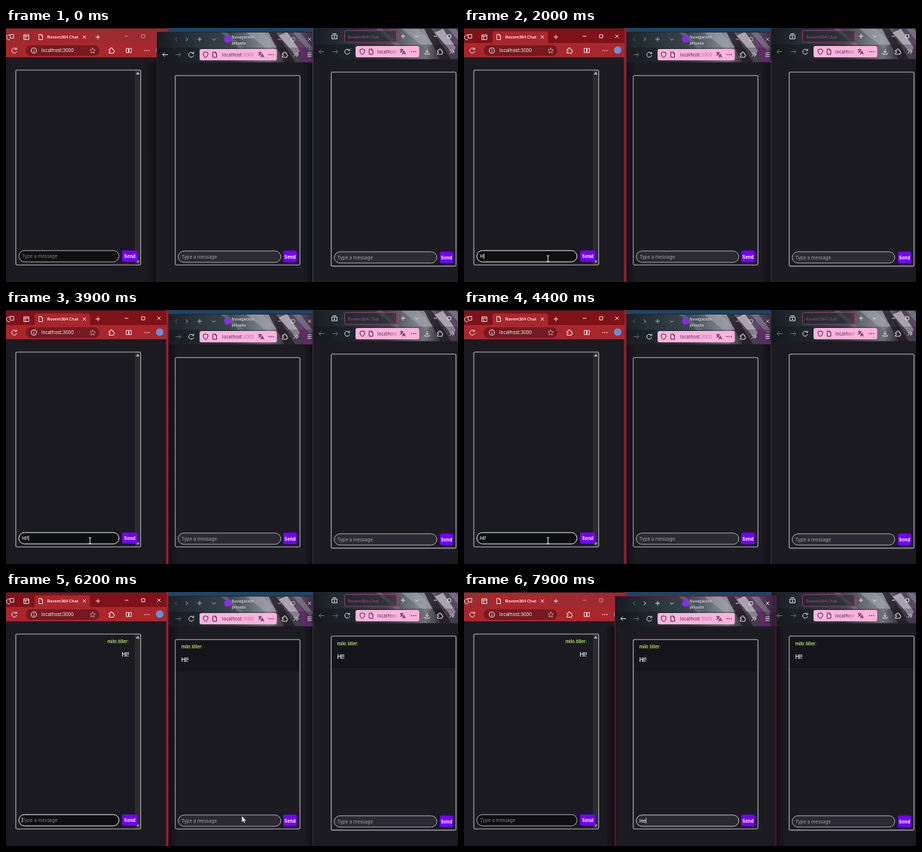
An HTML page that plays this animation: 600 by 338 pixels, repeating every 8000 ms.

```html
<!DOCTYPE html>
<html lang="en">
<head>
<meta charset="utf-8">
<title>Chat demo</title>
<style>
html, body { margin: 0; width: 100%; height: 100%; overflow: hidden; background: #1b1a20; }
svg { display: block; width: 100%; height: 100%; }
text { white-space: pre; }
.ui { font-family: "Open Sans", "Noto Sans", sans-serif; }
.chat { font-family: Inter, Roboto, sans-serif; }
</style>
</head>
<body>
<svg id="stage" viewBox="0 0 600 338">
  <defs>
    <linearGradient id="sky" gradientUnits="userSpaceOnUse" x1="0" x2="214" y1="0" y2="0">
      <stop offset="0" stop-color="#171b20"/><stop offset=".22" stop-color="#273138"/>
      <stop offset=".45" stop-color="#39434a"/><stop offset=".6" stop-color="#6c727b"/>
      <stop offset=".7" stop-color="#8d8e98"/><stop offset=".78" stop-color="#4a4550"/>
      <stop offset=".88" stop-color="#584a62"/><stop offset="1" stop-color="#33203a"/>
    </linearGradient>
    <linearGradient id="fade" x1="0" x2="1">
      <stop offset=".6" stop-color="#3a2440"/><stop offset="1" stop-color="#3a2440" stop-opacity=".15"/>
    </linearGradient>
    <linearGradient id="shadeL"><stop offset="0" stop-opacity="0"/><stop offset="1" stop-opacity=".4"/></linearGradient>
    <linearGradient id="shadeR"><stop offset="0" stop-opacity=".4"/><stop offset="1" stop-opacity="0"/></linearGradient>
  </defs>
  <rect width="600" height="338" fill="#1c4566"/>
  <g id="windows"><g id="L"></g><g id="M"></g><g id="R"></g></g>
  <g id="arrow"><path d="M0 0V8.4L2 6.7L3.3 9.6L4.6 9L3.4 6.2H6Z" fill="#fff" stroke="#222" stroke-width=".4"/></g>
  <g id="beam"><path d="M-1.8-4H1.8M0-4V4M-1.8 4H1.8" fill="none" stroke="#e8e8e8" stroke-width=".9"/></g>
</svg>
<script>
const LOOP = 8000, STEP = 100;
const USER = 'milo.tiller:', TITLE = 'Rovem364 Chat';
const $ = id => document.getElementById(id);

// Icon outlines, centred on 0,0
const ICONS = {
  back: 'M3.5 0H-3.5M-.7-2.8L-3.5 0L-.7 2.8',
  next: 'M-3.5 0H3.5M.7-2.8L3.5 0L.7 2.8',
  reload: 'M2.6-1.9A3.3 3.3 0 1 0 3.2.8M3.1-3.8V-1.5H.8',
  plus: 'M-3 0H3M0-3V3',
  cross: 'M-2.2-2.2L2.2 2.2M2.2-2.2L-2.2 2.2',
  min: 'M-2.3 0H2.3',
  max: 'M-2.1-2.1H2.1V2.1H-2.1Z',
  down: 'M-2.4-1L0 1.4L2.4-1',
  left: 'M1.2-2.5L-1.2 0L1.2 2.5',
  right: 'M-1.2-2.5L1.2 0L-1.2 2.5',
  more: 'M-3.2-2.6L-.6 0L-3.2 2.6M.4-2.6L3 0L.4 2.6',
  menu: 'M-2.8-2.4H2.8M-2.8 0H2.8M-2.8 2.4H2.8',
  doc: 'M-2.4-3.5H.8L2.5-1.8V3.5H-2.4ZM.8-3.5V-1.8H2.5',
  shield: 'M0-3.7L3-2.6V0Q2.6 2.6 0 3.8Q-2.6 2.6-3 0V-2.6Z',
  puzzle: 'M-3.2-1.8H-1.2Q-1.6-3.8 0-3.8T1.2-1.8H2.8V.1Q4-.1 4 1T2.8 1.9V3.5H-3.2V1.7Q-1.6 1.8-1.6.7T-3.2-.1Z',
  split: 'M-3.4-2.8H-.5V2.8H-3.4ZM.5-2.8H3.4V2.8H.5Z',
  info: 'M-3.6 0A3.6 3.6 0 1 0 3.6 0A3.6 3.6 0 1 0-3.6 0M0-.5V2M0-2V-1.3',
  star: 'M0-3.6L1.1-1.2L3.6-.9L1.7.8L2.2 3.4L0 2.1L-2.2 3.4L-1.7.8L-3.6-.9L-1.1-1.2Z',
  save: 'M0-3.5V1.4M-2-.6L0 1.4L2-.6M-3 1.6V3.3H3V1.6',
  lang: 'M-3.6-2.6H1M-1.4-3.8V-2.6M.2-2.6Q-.8.4-3.6 1.2M-2.7-2.2Q-1.8 0 .2.8M-.2 3.8L1.8-.9L3.8 3.8M.6 2.2H3',
  pages: 'M-3.3-3H3.3V3.4H-3.3ZM-3.3-1.1H3.3M-1-1V3.4',
  group: 'M-1.8-2.4A3.2 3.2 0 1 0-1.8 3.4M-1.4-3.4H3.2V1.6H-1.4Z',
  box: 'M-3.4-1.6H3.4V3.4H-3.4ZM-2.4-3.4H2.4M-1 1L0 2L1 1M0-.6V1.8'
};
const icon = (name, x, y, color = '#e6e2e6', w = .9) =>
  `<path d="${ICONS[name]}" transform="translate(${x} ${y})" fill="none" stroke="${color}" stroke-width="${w}"/>`;
const dots = (x, y, color) => [-2.8, 0, 2.8].map(d => `<circle cx="${x + d}" cy="${y}" r=".75" fill="${color}"/>`).join('');
const rect = (x, y, x2, y2, fill, extra = '') =>
  `<rect x="${x}" y="${y}" width="${x2 - x}" height="${y2 - y}" fill="${fill}" ${extra}/>`;
const poly = (points, fill, opacity = 1) => `<polygon points="${points}" fill="${fill}" opacity="${opacity}"/>`;
const text = (x, y, s, size, fill, cls = 'chat', extra = '') =>
  `<text x="${x}" y="${y}" class="${cls}" font-size="${size}" fill="${fill}" ${extra}>${s}</text>`;

const DARK = '#3a2440', PINK = '#ffb3dd', PAGE = '#1c1b22';
const LINE = '#acacb0', DIM = '#a0a0a5';
const pill = (x, y, x2) => rect(x, y, x2, y + 15, PINK, 'rx="2.5"');
const shadeL = (x, y) => rect(x - 13, y, x, 338, 'url(#shadeL)');
const shadeR = (x, y) => rect(x, y, x + 13, 338, 'url(#shadeR)');

// Abstract header artwork, shared by both themed windows
const art = (x, y) => `<g transform="translate(${x} ${y})">
  ${rect(0, 0, 214.5, 41, 'url(#sky)')}
  ${poly('84,0 92,0 116,21 112,24', '#7d868c', .45)}
  ${poly('118,0 140,0 160,20 150,26', '#a9abb4', .5)}
  ${poly('148,0 158,0 184,41 170,41', '#231d27', .8)}
  ${poly('162,5 173,0 190,25 186,33', '#cfcad6', .7)}
  ${poly('180,0 190,0 207,22 204,28', '#8d8498', .6)}
  ${poly('188,14 200,24 208,41 194,41', '#82308a', .75)}
  ${rect(0, 21, 214.5, 41, '#15141a', 'opacity=".25"')}
  ${rect(0, 21, 56, 41, '#12141a', 'opacity=".3"')}</g>`;

// Frame, input and button of one chat page
function chatPage(id, p) {
  const [x, y, x2, y2] = p.frame, [ix, iy, ix2, iy2] = p.input, [bx, by, bx2, by2] = p.button;
  const own = id === 'L', tx = own ? x2 - 15.5 : x + 8;
  const anchor = own ? 'text-anchor="end"' : '';
  const base = (iy + iy2) / 2 + 2.2;
  return `
    <g id="${id}msg">
      ${own ? '' : rect(x, y, x2, y + 42.5, '#15141a')}
      ${text(tx, y + 12, USER, 5.8, '#a9d65c', 'chat', 'font-weight="700" ' + anchor)}
      ${text(tx, y + 29.7, 'HI!', 7.2, '#f4f4f6', 'chat', 'font-weight="600" ' + anchor)}
    </g>
    ${own ? rect(171, y, x2, y2, '#2b2b2e') + poly('172.2,62 177.6,62 174.9,58', '#a5a5a8') +
      poly('172.4,309.5 177.2,309.5 174.8,313', '#a5a5a8') : ''}
    ${rect(x, y, x2, y2, 'none', `rx="1.5" stroke="${LINE}" stroke-width="1.1"`)}
    ${rect(ix, iy, ix2, iy2, p.fill, `rx="${(iy2 - iy) / 2}" stroke="${DIM}" id="${id}box"`)}
    ${text(ix + 4.2, base, 'Type a message', 6.1, p.hint, 'chat', `id="${id}hint"`)}
    ${text(ix + 4.2, base, '', 6.1, '#f4f4f6', 'chat', `id="${id}val" font-weight="500"`)}
    ${rect(0, base - 5.8, .7, base + 1.3, '#fff', `id="${id}caret"`)}
    ${rect(bx, by, bx2, by2, '#7300f7', 'rx="2"')}
    ${text((bx + bx2) / 2, base, 'Send', 6, '#fff', 'chat', 'font-weight="700" text-anchor="middle"')}`;
}

$('L').innerHTML = `
  ${shadeR(215.5, 46)}
  ${rect(0, 0, 215.5, 338, '#a01d30')}
  ${rect(0, 0, 213, 1, '#2c1720')}
  ${rect(0, 1, 213, 21, '#7f1219', 'id="Lbar"')}
  <path d="M36 21Q38 21 38 18V7Q38 4.5 40.500 4.500H109Q111.500 4.500 111.500 7V18Q111.500 21 114 21Z" fill="#a8272c"/>
  ${rect(0, 20, 213, 39, '#a8272c')}
  ${rect(0, 39, 212.5, 338, '#1b1a20')}
  ${icon('group', 7, 12)}${icon('pages', 27, 12)}${icon('doc', 46, 12)}
  ${text(54.8, 14.1, TITLE, 5.5, '#fff', 'ui', 'font-weight="600"')}
  ${icon('cross', 104, 12)}${icon('plus', 122, 12)}
  <g id="Lctl">${icon('min', 160, 11)}${icon('max', 182, 11)}${icon('cross', 203, 11)}</g>
  ${icon('reload', 11, 30)}
  ${rect(26, 23, 124, 37, '#741a20', 'rx="7"')}
  ${icon('info', 37, 30)}${text(47, 32.3, 'localhost:3000', 6.35, '#fff', 'ui')}${icon('star', 115, 30, '#d8b8ba', .7)}
  ${icon('puzzle', 140, 30)}${icon('split', 163, 30)}${dots(187, 30, '#f0e6e6')}
  <circle cx="204" cy="29.500" r="5" fill="#6a8fd8"/>
  ${chatPage('L', { frame: [13, 56, 178.8, 315.2], input: [17, 296.2, 150, 311.2], button: [154, 296, 174.5, 311], fill: '#0d0f10', hint: '#838386' })}`;

$('M').innerHTML = `
  ${shadeL(200, 46)}${shadeR(414, 46)}
  ${art(200, 5)}
  ${rect(200, 45.5, 414.5, 338, PAGE)}
  <g id="Mctl">
    ${icon('left', 226, 15, '#77777f')}${icon('right', 240, 15)}${icon('plus', 257, 15)}${icon('down', 276, 15)}
    ${icon('min', 363, 15)}${icon('max', 381, 15)}${icon('cross', 403, 15)}
  </g>
  <circle cx="294" cy="15" r="4.500" fill="#8a2be8"/>
  ${text(299.5, 14, 'Navegación', 5.4, '#f4f0f6', 'ui')}${text(299.5, 21.5, 'privada', 5.4, '#f4f0f6', 'ui')}
  ${icon('back', 211.5, 35.5)}${icon('next', 228.5, 35.5, '#66666e')}${icon('reload', 246, 35.5)}
  ${pill(257, 28, 359.5)}
  ${icon('shield', 265, 35.5, DARK)}${icon('doc', 277, 35.5, DARK)}
  ${text(287, 38, 'localhost<tspan fill="#a5729a">:3000</tspan>', 6.25, DARK, 'ui')}
  ${icon('lang', 338.5, 35.5, DARK)}${dots(352, 35.5, DARK)}
  ${icon('puzzle', 370, 35.5)}${icon('more', 385, 35.5)}${icon('menu', 403, 35.5)}
  ${chatPage('M', { frame: [224.7, 63.2, 390.2, 315.2], input: [228.7, 296.8, 364.8, 311.8], button: [368, 296.3, 386, 311.7], fill: '#2b2a33', hint: '#a3a2aa' })}
  <path id="Medge" d="M200.500 338V5.500H414V338" fill="none" stroke-width="1"/>`;

$('R').innerHTML = `
  ${shadeL(407, 46)}
  ${art(407, 1)}
  ${rect(407, 0, 600, 1, '#20262c')}
  <circle cx="517" cy="11" r="7" fill="none" stroke="#a02438" stroke-width="1" opacity=".75"/>
  ${rect(407.5, 41.5, 600, 338, PAGE)}
  ${icon('box', 436, 11)}
  ${rect(449.5, 3.5, 518.5, 19, '#20222a', 'rx="2" fill-opacity=".5" stroke="#a33a78" stroke-width=".8"')}
  ${text(454, 13.6, TITLE, 5.6, '#b04a88', 'ui')}
  ${icon('plus', 527, 11)}${icon('down', 545, 11)}${icon('min', 570, 11)}${icon('max', 588.5, 11)}
  ${icon('back', 419, 31.5, '#74747b')}${icon('next', 437, 31.5, '#66666e')}${icon('reload', 453, 31.5)}
  ${pill(464, 24, 548.5)}
  ${icon('shield', 473, 31.5, DARK)}${icon('doc', 484.5, 31.5, DARK)}
  ${text(493, 34, 'localhost', 6.25, 'url(#fade)', 'ui')}
  ${icon('lang', 526.5, 31.5, DARK)}${dots(541, 31.5, DARK)}
  ${icon('save', 559, 31.5)}${icon('puzzle', 576, 31.5)}${icon('more', 592, 31.5)}
  ${chatPage('R', { frame: [431.7, 58.8, 597.3, 316.9], input: [435.7, 297.8, 571.9, 312.8], button: [576, 297.5, 593.5, 313], fill: '#2b2a33', hint: '#a3a2aa' })}
  ${rect(407, 0, 408, 338, '#3d4652', 'id="Redge"')}`;

// Each track lists [start, value]; the value holds until the next start
const TRACKS = {
  order: [[0, 'LMR'], [900, 'MLR'], [6400, 'LRM']],
  Ltext: [[0, ''], [2000, 'H'], [2200, 'HI'], [2800, 'HI!'], [4700, '']],
  Mtext: [[0, ''], [7500, 'H'], [7900, 'He']],
  Lcaret: [[0, 0], [900, 1], [1400, 0], [2000, 1], [2700, 0], [2800, 1], [3400, 0], [3900, 1],
    [4400, 0], [5000, 1], [5500, 0], [6000, 1], [6400, 0]],
  Mcaret: [[0, 0], [6400, 1], [6900, 0], [7400, 1]],
  pointer: [[0, ''], [300, 'arrow'], [900, 'beam'], [5600, 'arrow'], [6300, 'beam'], [7500, '']]
};
const PATH = [[300, 432, 300], [900, 114, 305], [1100, 111.5, 307], [5500, 111.5, 307], [6200, 313, 298], [6400, 312.5, 299]];

const at = (name, t) => TRACKS[name].filter(k => k[0] <= t).pop()[1];
const show = (id, on) => $(id).setAttribute('visibility', on ? 'inherit' : 'hidden');
const paint = (id, attr, value) => $(id).setAttribute(attr, value);

function pointerAt(t) {
  const i = PATH.findIndex(k => k[0] > t);
  if (i <= 0) return (i ? PATH[PATH.length - 1] : PATH[0]).slice(1);
  const [t0, ...a] = PATH[i - 1], [t1, ...b] = PATH[i];
  const u = (1 - Math.cos(Math.PI * (t - t0) / (t1 - t0))) / 2;
  return a.map((v, n) => v + (b[n] - v) * u);
}

function field(id, value, caret) {
  const val = $(id + 'val');
  val.textContent = value;
  show(id + 'hint', !value);
  show(id + 'caret', caret);
  paint(id + 'caret', 'x', +val.getAttribute('x') + (value ? val.getComputedTextLength() + .4 : 0));
}

function draw(t) {
  const order = at('order', t), left = order === 'MLR', mid = order === 'LRM';
  for (const id of order) $('windows').append($(id));
  paint('Lbar', 'fill', left ? '#7f1219' : '#9c2a2e');
  paint('Lctl', 'opacity', left ? 1 : .5);
  paint('Lbox', 'stroke', left ? '#e0e0e2' : DIM);
  paint('Mctl', 'opacity', mid ? 1 : .7);
  paint('Mbox', 'stroke', mid ? '#b8b8bc' : DIM);
  paint('Medge', 'stroke', mid ? '#7d1233' : '#26252c');
  paint('Redge', 'fill', left ? '#34303a' : '#3d4652');
  field('L', at('Ltext', t), at('Lcaret', t));
  field('M', at('Mtext', t), at('Mcaret', t));
  field('R', '', 0);
  show('Lmsg', t >= 4700);
  show('Mmsg', t >= 4800);
  show('Rmsg', t >= 4800);
  const kind = at('pointer', t), [x, y] = pointerAt(t);
  for (const id of ['arrow', 'beam']) {
    show(id, id === kind);
    paint(id, 'transform', `translate(${x} ${y})`);
  }
}

let last = -1;
const start = performance.now();
function tick() {
  const t = Math.floor((performance.now() - start) % LOOP / STEP) * STEP;
  if (t !== last) draw(last = t);
  requestAnimationFrame(tick);
}
tick();
</script>
</body>
</html>
```
